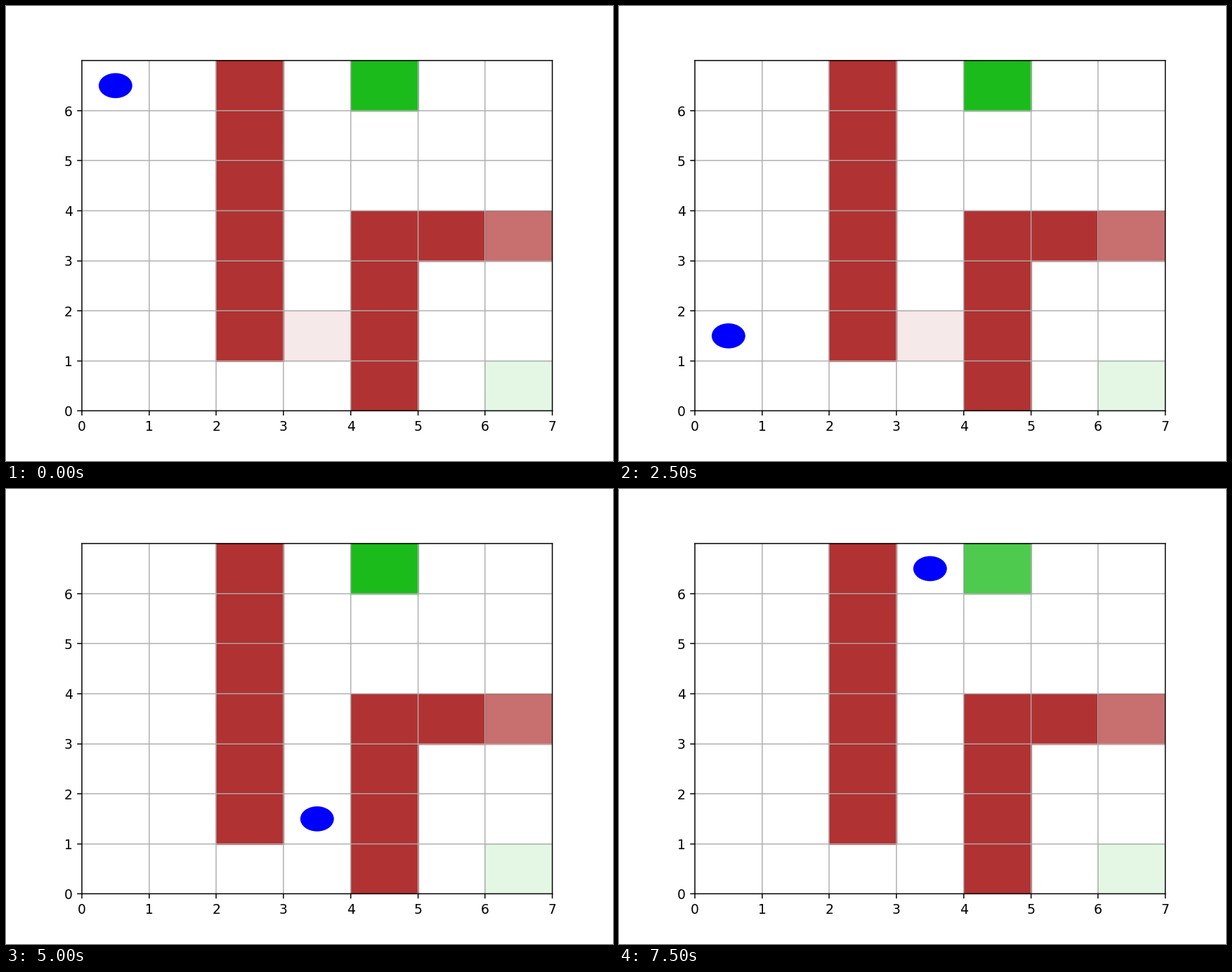
Animation of 864 by 648 pixels, one loop 8000 ms. Source, as a matplotlib script:

```python
import math

import matplotlib.pyplot as plt
from matplotlib.animation import FuncAnimation
from matplotlib.patches import Circle, Rectangle

N = 7
W, H = 1280, 960                    # fine pixel lattice the strokes sit on
LEFT, BASE = 0.125 * W, 0.89 * H
CELL_W, CELL_H = 0.775 * W / N, 0.77 * H / N
RED = (169 / 255, 27 / 255, 27 / 255)
GREEN = (3 / 255, 180 / 255, 3 / 255)

plt.rcParams["font.family"] = "DejaVu Sans"
fig, ax = plt.subplots(figsize=(6.4, 4.8), dpi=135)
fig.subplots_adjust(left=0.125, right=0.9, bottom=0.11, top=0.88)
ax.set(xlim=(0, N), ylim=(0, N), xticks=range(N + 1), yticks=range(N))
ax.tick_params(width=0)
ax.spines[:].set_visible(False)


def gx(i, shift=0.0):
    """Column edge i aligned to the lattice, in data units."""
    return (math.floor(LEFT + i * CELL_W + 0.5) + shift - LEFT) / CELL_W


def gy(j, shift=0.0):
    """Row edge j aligned to the lattice, in data units."""
    return (BASE - math.floor(BASE - j * CELL_H + 0.5) - shift) / CELL_H


def line(xs, ys, color, z, cap="projecting"):
    ax.plot(xs, ys, color=color, lw=0.8, zorder=z, snap=False,
            clip_on=False, solid_capstyle=cap)


def cell(col, row, color, alpha):
    x, y = gx(col, 0.5), gy(row, 0.5)
    return ax.add_patch(Rectangle(
        (x, y), gx(col + 1, 0.5) - x, gy(row + 1, 0.5) - y,
        color=color, alpha=alpha, lw=1, snap=False))


trap = cell(3, 1, RED, 0.095)
for row in range(1, N):
    cell(2, row, RED, 0.9)
for row in range(4):
    cell(4, row, RED, 0.9)
cell(5, 3, RED, 0.9)
cell(6, 3, RED, 0.63)
cell(6, 0, GREEN, 0.105)
goal = cell(4, 6, GREEN, 0.9)

for i in range(1, N):
    line([gx(i)] * 2, [gy(0), gy(N)], "#b0b0b0", 1.5, "butt")
    line([gx(0), gx(N)], [gy(i)] * 2, "#b0b0b0", 1.5, "butt")
for i in (0, N):
    line([gx(i)] * 2, [gy(0), gy(N)], "black", 2.5)
    line([gx(0), gx(N)], [gy(i)] * 2, "black", 2.5)
for i in range(N + 1):
    line([gx(i)] * 2, [gy(0), gy(0, 10)], "black", 2.01, "butt")
    if i < N:
        line([gx(0, -10), gx(0)], [gy(i)] * 2, "black", 2.01, "butt")

ball = ax.add_patch(Circle((0.5, 6.5), 0.25, fc="blue", ec="none"))


def position(step):
    """Down the first column, right along the bottom, up the fourth."""
    if step <= 6:
        return 0, 6 - step
    if step <= 9:
        return step - 6, 0
    return 3, step - 9


def update(step):
    col, row = position(step)
    ball.center = col + 0.5, row + 0.5
    trap.set_visible(step < 8)
    goal.set_alpha(0.7 if step == 15 else 0.9)
    return ball, trap, goal


anim = FuncAnimation(fig, update, frames=16, interval=500,
                     repeat=True, repeat_delay=0, blit=False)
plt.show()
```
